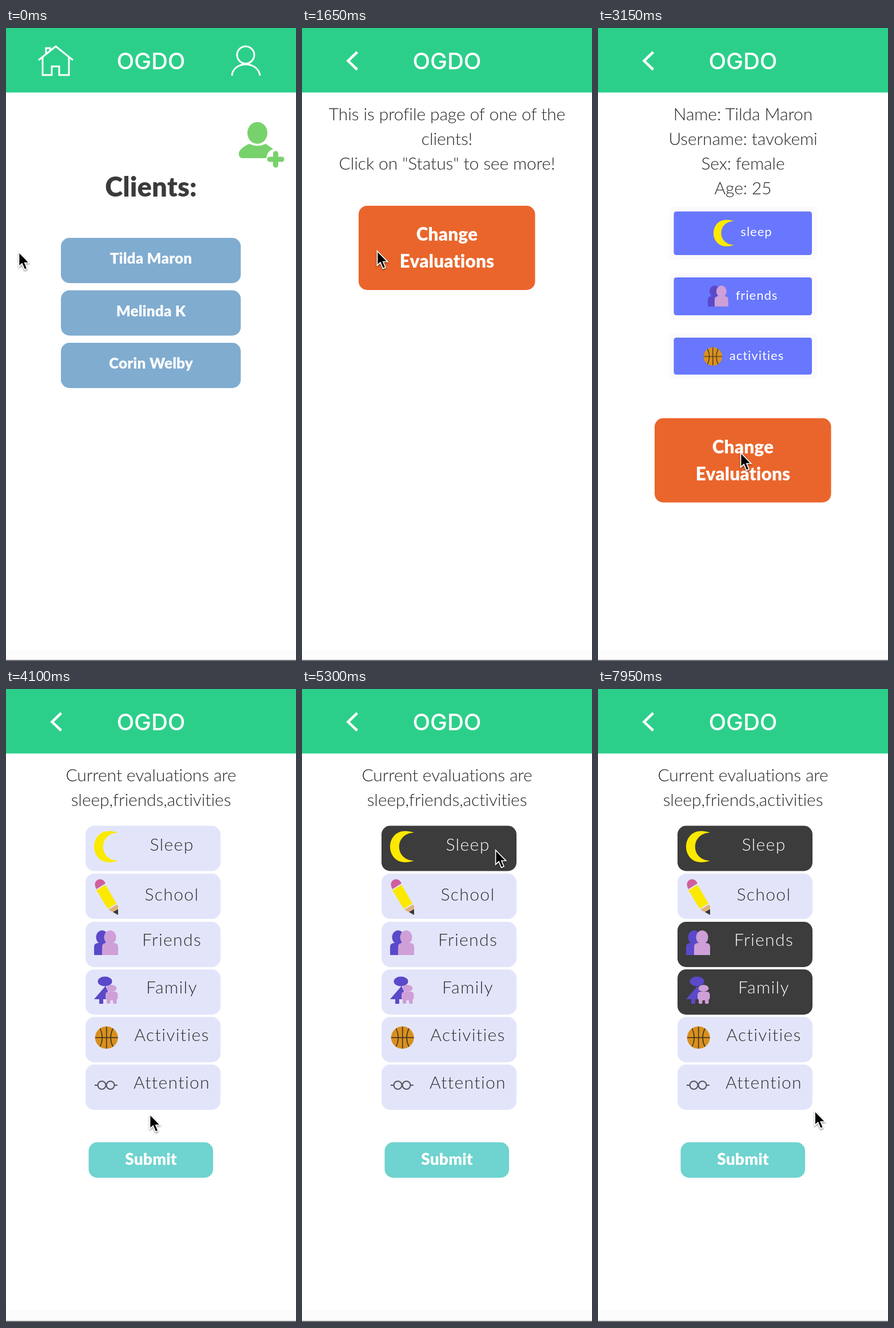
These frames come from a looping animation (507 px wide and 1104 px high, 8000 ms). An HTML page:

```html
<!DOCTYPE html>
<html lang="en">
<head>
<meta charset="utf-8">
<title>Client evaluations</title>
<style>
  html, body { margin: 0; width: 100%; height: 100%; overflow: hidden; background: #fff; }
  svg { display: block; width: 100%; height: 100%; }
  text { text-anchor: middle; font-family: Lato, sans-serif; font-variant-ligatures: none; }
  .brand { font: 500 40px Inter, sans-serif; fill: #fff; }
  .bold { font-weight: 900; fill: #fff; letter-spacing: .2px; }
  .body { font-weight: 300; font-size: 30px; fill: #262626; letter-spacing: -.1px; }
  .chip { font-size: 22px; fill: #fff; letter-spacing: 1px; }
  .option { font-weight: 300; font-size: 30px; letter-spacing: 1.4px; fill: #2c2c2c; }
  .card { fill: #e2e5fa; }
  .picked .card { fill: #3c3c3c; }
  .picked .option { fill: #fff; }
  .line { fill: none; stroke: #fff; stroke-width: 3; }
</style>
</head>
<body>
<svg viewBox="0 0 507 1104" id="stage"></svg>
<script>
const LOOP = 8000;
const PURPLE = '#5a49c9', PINK = '#cf9fd8';

const rect = (x, y, w, h, r, fill, cls = '') =>
  `<rect x="${x}" y="${y}" width="${w}" height="${h}" rx="${r}" fill="${fill}" class="${cls}"/>`;
const text = (x, y, cls, label, size) =>
  `<text x="${x}" y="${y}" class="${cls}"${size ? ` font-size="${size}"` : ''}>${label}</text>`;
const ellipse = (x, y, rx, ry, fill) =>
  `<ellipse cx="${x}" cy="${y}" rx="${rx}" ry="${ry}" fill="${fill}"/>`;
const path = (d, fill, extra = '') => `<path d="${d}" fill="${fill}" ${extra}/>`;
const group = (content, attrs = '') => `<g ${attrs}>${content}</g>`;
const lines = (...labels) => labels.map((s, i) => text(253.5, 161 + i * 42.9, 'body', s)).join('');

// Icons are drawn in a box 42 wide with its origin at the left, on the vertical centre.
const icons = {
  sleep: path('M42 -25C-14 -44 -14 43 42 24C7 23 7 -24 42 -25Z', '#fbe900'),
  school:
    path('M1 -15L4 -13Q-2 -24 6 -29Q15 -33 20 -23L4 -13Z', '#cf5f9e') +
    path('M4 -11L20 -20.500L39 12L24 21.500Z', '#fbe900') +
    path('M25 23L40 14L42 17V32Z', '#deb080') +
    path('M33 27L42 22V32Z', '#383838'),
  friends:
    ellipse(14, -10, 10.5, 12, PURPLE) + path('M0 21V7Q0 0 7 0H22V21Z', PURPLE) +
    ellipse(28, -10, 10.5, 12, PINK) + path('M14 21V7Q14 0 21 0H35Q42 0 42 7V21Z', PINK),
  family:
    ellipse(19, -16, 12.5, 8.5, PURPLE) + path('M20 -8L0 15H9V23H16V15H31Z', PURPLE) +
    ellipse(30.5, -4, 9, 6, PINK) + rect(20, 2, 21.5, 15, 5, PINK) +
    rect(22, 12, 6.5, 11, 2, PINK) + rect(33, 12, 6.5, 11, 2, PINK),
  activities:
    ellipse(21.7, 0, 20, 19.5, '#d8901f') +
    path('M1.700 0H41.700M21.700 -19V19M10.500 -16Q18 0 10.500 16M33 -16Q25 0 33 16', 'none',
      'stroke="#3b2e20" stroke-width="1.500"'),
  attention: path('M1 0H6.500M35.500 0H41M20 0H22M6.500 0a7 7 0 1 0 14 0a7 7 0 1 0 -14 0M21.500 0a7 7 0 1 0 14 0a7 7 0 1 0 -14 0',
    'none', 'stroke="#55555f" stroke-width="2"'),
};
const icon = (name, x, y, scale = 1) => group(icons[name], `transform="translate(${x} ${y}) scale(${scale})"`);

const homeIcons = group(
  '<path class="line" d="M57 56L87 32L117 56M64 51V82H80V67H93V82H110V51M70 45V35H77V39"/>' +
  '<circle class="line" cx="419" cy="47" r="15"/>' +
  '<path class="line" d="M395 83C397 57 441 57 444 83"/>');
const backIcon = '<path class="line" style="stroke-width:4.500" d="M96.500 42L80.500 57.300L96.500 72.500"/>';

const addIcon =
  ellipse(439.5, 183, 17.5, 19, '#78d26b') +
  path('M414 227Q407 227 407 219Q407 211 425 202Q440 209 454 202L467 211Q457 214 455 227Z', '#78d26b') +
  path('M471.500 219V239M461 229H482', 'none', 'stroke="#78d26b" stroke-width="9" stroke-linecap="round"');

const clientButton = (y, name) => rect(96, y, 314.5, 79, 15, '#80acd0') + text(253.5, y + 45, 'bold', name, 26);
const changeButton = y =>
  rect(99, y, 308.5, 147, 15, '#ea652b') +
  text(253.5, y + 61, 'bold', 'Change', 31.5) + text(253.5, y + 108, 'bold', 'Evaluations', 31.5);
const chip = (y, h, name, iconX, iconY, scale, textX, baseline) =>
  rect(124, y - 8, 259, h + 16, 6, '#fbfbfc') + rect(132.5, y, 241.5, h, 4.5, '#6877fd') +
  icon(name, iconX, iconY, scale) + text(textX, baseline, 'chip', name);

const options = [
  ['Sleep', 238.5, 275.5, 282], ['School', 322, 362, 369], ['Friends', 406, 443, 448],
  ['Family', 489, 526, 531], ['Activities', 572, 608, 614], ['Attention', 655, 691, 697],
];
const option = ([label, y, iconY, baseline]) => group(
  rect(139, y, 236, 79, 15, '#e2e5fa', 'card') + icon(label.toLowerCase(), 154, iconY) +
  text(290, baseline, 'option', label), `id="${label}"`);

const pages = [
  { id: 'clients', from: 0, content: homeIcons + addIcon +
      `<text x="253.5" y="294" class="bold" font-size="47" style="fill:#3b3b3b">Clients:</text>` +
      clientButton(366, 'Tilda Maron') + clientButton(457.5, 'Melinda K') + clientButton(549, 'Corin Welby') },
  { id: 'profile', from: 1650, content: backIcon +
      lines('This is profile page of one of the', 'clients!', 'Click on "Status" to see more!') +
      changeButton(310) },
  { id: 'details', from: 1850, content: backIcon +
      lines('Name: Tilda Maron', 'Username: tavokemi', 'Sex: female', 'Age: 25') +
      chip(320, 76, 'sleep', 202, 358, .85, 277, 363) +
      chip(435, 66, 'friends', 192, 468, .85, 277.5, 474) +
      chip(540, 64.5, 'activities', 183, 573, .82, 277.5, 579) + changeButton(680.5) },
  { id: 'evaluations', from: 3250, content: backIcon +
      lines('Current evaluations are', 'sleep,friends,activities') + options.map(option).join('') +
      rect(144.5, 790.5, 217.5, 62, 15, '#6fd3cf') + text(253.5, 830, 'bold', 'Submit', 28) },
];
const pickedAt = { Sleep: 4950, Friends: 5800, Family: 7600 };

// Pointer moves: start, end, destination x and y, sideways bend.
const start = [22.5, 391];
const moves = [
  [800, 1250, 131.5, 389, 0],
  [2100, 2900, 249.5, 741, 0],
  [3150, 3300, 251.5, 742, 0],
  [4100, 4850, 338.5, 281, 190],
  [5400, 5750, 328.5, 441, 0],
  [6750, 7250, 324, 520, 0],
  [7600, 7950, 379, 736, 0],
];

const byId = id => document.getElementById(id);
byId('stage').innerHTML =
  rect(0, 0, 507, 1104, 0, '#fff') + rect(0, 1084, 507, 18, 0, '#fcfcfd') +
  rect(0, 1102, 507, 2, 0, '#77777b') + rect(0, 0, 507, 112.5, 0, '#2ccf8a') +
  text(253.5, 72, 'brand', 'OGDO') +
  pages.map(p => group(p.content, `id="${p.id}"`)).join('') +
  group(path('M0 0V25L5.500 20L10 30.500L14.500 28.500L10.300 18.500H18Z', '#000',
    'stroke="#fff" stroke-width="1.700"'), 'id="pointer" style="filter:drop-shadow(0 2px 1.500px #0006)"');

function pointerAt(t) {
  let [x, y] = start;
  for (const [from, to, endX, endY, bend] of moves) {
    if (t < from) break;
    const u = Math.min(1, (t - from) / (to - from));
    const e = u * u * (3 - 2 * u);
    x += (endX - x) * e + 2 * bend * e * (1 - e);
    y += (endY - y) * e;
  }
  return [x, y];
}

function draw(now) {
  const t = now % LOOP;
  const current = pages.findLast(p => t >= p.from);
  for (const p of pages) byId(p.id).style.display = p === current ? '' : 'none';
  for (const id in pickedAt) byId(id).classList.toggle('picked', t >= pickedAt[id]);
  byId('pointer').setAttribute('transform', `translate(${pointerAt(t)})`);
}

const origin = performance.now();
function tick() {
  draw(performance.now() - origin);
  requestAnimationFrame(tick);
}
tick();
</script>
</body>
</html>
```
